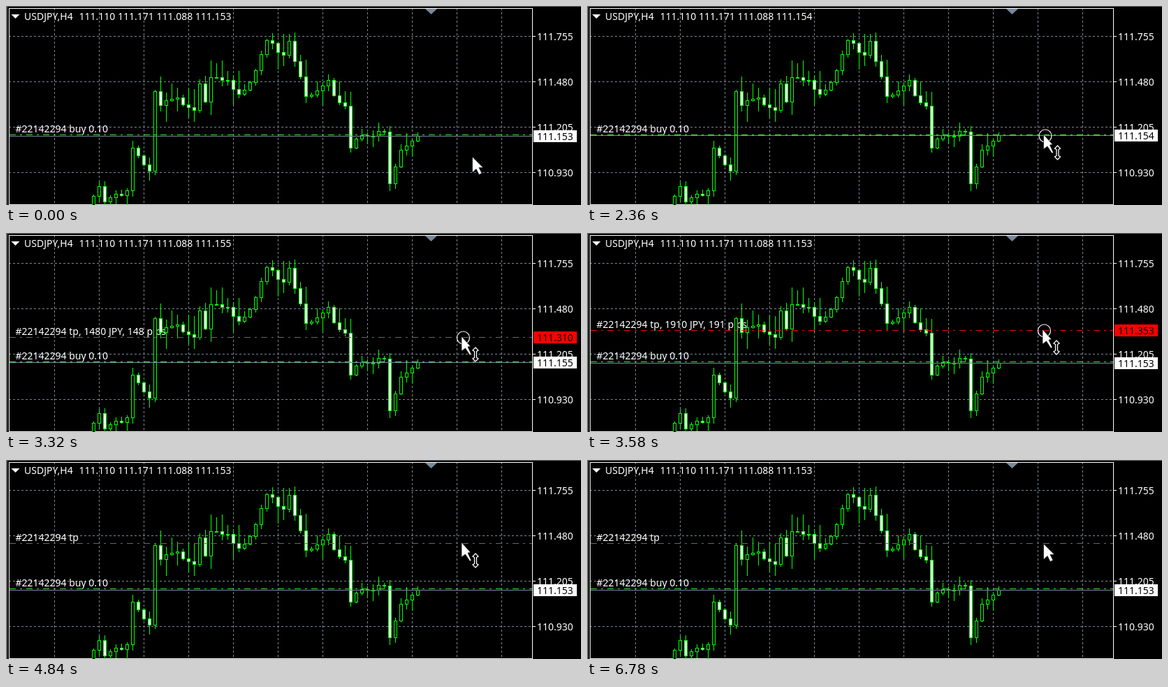
Recreate the animation shown at these times as an HTML page. Size 823 by 285 pixels, loop 6880 ms.

```html
<!DOCTYPE html>
<html lang="en">
<head>
<meta charset="utf-8">
<title>Dragging a take-profit line</title>
<style>
  html, body { margin: 0; width: 100%; height: 100%; overflow: hidden; background: #000; }
  svg { display: block; width: 823px; height: 285px; }
  text { font: 14px "Noto Sans", "Open Sans", sans-serif; fill: #fff; white-space: pre; }
  .crisp { shape-rendering: crispEdges; }
  .grid { stroke: #778899; stroke-dasharray: 3 3; }
  .order { stroke-dasharray: 9 6 3 6; }
  .dark { fill: #000; }
</style>
</head>
<body>
<svg viewBox="0 0 823 285">
  <rect width="823" height="285"/>
  <g class="crisp">
    <rect width="823" height="1" fill="#696969"/>
    <rect width="2" height="285" fill="#696969"/>
  </g>
  <g id="grid" class="crisp"></g>
  <path class="crisp" d="M4.5 3.5H753.5V284.5H4.5Z" fill="none" stroke="#fff"/>
  <path d="M600 4H617L608.5 12Z" fill="#778899"/>
  <path d="M7.5 12H19.5L13.5 18Z" fill="#fff"/>
  <text x="26" y="20">USDJPY,H4</text>
  <text id="title" x="104.5" y="20"></text>
  <text x="13.5" y="181">#22142294 buy 0.10</text>
  <text id="tpText" x="13.5"></text>
  <g id="candles" class="crisp" stroke="#0f0"></g>
  <line id="bidLine" class="crisp" x1="5" x2="753" stroke="#778899"/>
  <line class="crisp order" x1="5" x2="753" y1="184.5" y2="184.5" stroke="#32e632"/>
  <line id="tpLine" class="crisp order" x1="5" x2="753"/>
  <g id="axis"></g>
  <g id="tpTag">
    <rect class="crisp" x="755" y="-8" width="62" height="17" fill="#f00"/>
    <text class="dark" x="760" y="6"></text>
  </g>
  <g id="bidTag">
    <rect class="crisp" x="755" y="-8" width="62" height="17" fill="#fff"/>
    <text class="dark" x="760" y="6"></text>
  </g>
  <g id="cursor">
    <circle id="ring" cx="2.5" cy="2" r="9" fill="none" stroke="#fff" stroke-width="1.2"/>
    <path id="arrow" fill="#fff" stroke="#000" stroke-width=".6"/>
    <path id="resize" stroke="#fff" stroke-width="1.3"
      d="M20 16L24 20L21.5 21.5V30.5L24 32L20 36L16 32L18.5 30.5V21.5L16 20Z"/>
  </g>
</svg>
<script>
const LOOP = 6880, STEP = 135;
const HOVER = 1930, PRESS = 2760, RELEASE = 4840, LEAVE = 4960;
const BUY_PIPS = 111162;
const $ = id => document.getElementById(id);

function set(el, attrs) {
  for (const key in attrs) el.setAttribute(key, attrs[key]);
}
function add(parent, tag, attrs, text = "") {
  const el = document.createElementNS("http://www.w3.org/2000/svg", tag);
  set(el, attrs);
  el.textContent = text;
  return parent.appendChild(el);
}
function show(el, on) {
  el.style.display = on ? "" : "none";
}
const quote = pips => (pips / 1000).toFixed(3);
const lerp = (a, b, p) => a + (b - a) * p;
const smooth = p => p * p * (3 - 2 * p);
const slowing = p => p * (1.445 - .445 * p);

// Progress from 0 to 1 in equal time steps, the first one at start
function stepped(t, start, count) {
  const done = Math.floor((t - start) / STEP) + 1;
  return Math.min(Math.max(done, 0), count) / count;
}

let seed = 11;
function random() {
  seed = (seed * 16807) % 2147483647;
  return seed / 2147483647;
}

// Grid and price axis
for (let x = 69; x < 753; x += 64)
  add($("grid"), "line", { class: "grid", x1: x + .5, x2: x + .5, y1: 3, y2: 285 });
for (let i = 0; i < 4; i++) {
  const y = 43 + 65 * i;
  add($("grid"), "line", { class: "grid", x1: 4, x2: 753, y1: y + .5, y2: y + .5 });
  add($("axis"), "rect", { class: "crisp", x: 754, y, width: 4, height: 1, fill: "#fff" });
  add($("axis"), "text", { x: 760, y: y + 6 }, quote(111755 - 275 * i));
}

// Turning points of the price: candle index, y
const turns = [
  [0, 290], [2, 258], [3, 280], [7, 264], [8, 203], [11, 236], [12, 122], [13, 142],
  [16, 131], [19, 149], [20, 111], [21, 137], [22, 102], [25, 106], [27, 126], [29, 109],
  [32, 49], [35, 70], [36, 50], [39, 129], [43, 106], [44, 128], [46, 143], [47, 203],
  [49, 185], [53, 180], [54, 254], [56, 206], [59, 186]
];
function closeAt(i) {
  const next = turns.findIndex(turn => turn[0] >= i);
  const [i1, y1] = turns[next];
  if (i1 === i) return y1;
  const [i0, y0] = turns[next - 1];
  return Math.round(lerp(y0, y1, (i - i0) / (i1 - i0)) + 8 * (random() - .5));
}

const wick = () => Math.round(2 + 24 * random() ** 2);
function drawCandle(i, open, close) {
  const x = 117.5 + 8 * i;
  const top = Math.min(open, close), height = Math.abs(open - close);
  add($("candles"), "line", { x1: x, x2: x, y1: top - wick(), y2: top + height + wick() });
  return add($("candles"), "rect", {
    x: x - 2, y: top + .5, width: 4, height: Math.max(height, 1),
    fill: close > open ? "#fff" : "#000"
  });
}
let open = 300, lastBody;
for (let i = 0; i < 60; i++) {
  const close = closeAt(i);
  lastBody = drawCandle(i, open, close);
  open = close;
}
const lastBottom = +lastBody.getAttribute("y") + +lastBody.getAttribute("height");

// Bid: time, last digits
const bids = [
  [0, 153], [1530, 154], [3320, 155], [3440, 152], [3580, 153],
  [5550, 154], [6360, 153], [6510, 152], [6660, 154], [6780, 153]
];
const plainArrow = "M0 0L15.5 15.5H9.5L13.5 23.5L9.5 25.5L5.5 17.5L0 22.5Z";
const slimArrow = "M0 0L13 14.5L9 15L14 26L12 27L5.5 17L0 21Z";

function drawBid(t) {
  const digits = bids.findLast(bid => bid[0] <= t)[1];
  const y = digits < 154 ? 186 : 185;
  $("title").textContent = "111.110 111.171 111.088 111." + digits;
  $("bidTag").lastElementChild.textContent = "111." + digits;
  set($("bidTag"), { transform: `translate(0 ${y})` });
  set($("bidLine"), { y1: y + .5, y2: y + .5 });
  set(lastBody, { y: y + .5, height: lastBottom - y - .5 });
}

const levelAt = t => Math.round(lerp(176, 119, slowing(stepped(t, PRESS + STEP, 11))));

function drawTakeProfit(t) {
  const placed = t >= PRESS, dragging = placed && t < RELEASE;
  const y = levelAt(t);
  const pips = Math.round(148 + (149 - y) * 98 / 23);
  const red = dragging && t >= 3580;
  show($("tpLine"), placed);
  show($("tpText"), placed);
  show($("tpTag"), dragging);
  set($("tpLine"), { y1: y + .5, y2: y + .5, stroke: red ? "#f00" : "#666" });
  set($("tpText"), { y: y - 3 });
  $("tpText").textContent = "#22142294 tp" + (dragging ? `, ${pips * 10} JPY, ${pips} pips` : "");
  set($("tpTag"), { transform: `translate(0 ${y})` });
  $("tpTag").lastElementChild.textContent = quote(BUY_PIPS + pips);
}

function pointerAt(t) {
  if (t >= LEAVE) return [653.5, 120];
  if (t >= PRESS) return [652, levelAt(t) - 1];
  const near = smooth(stepped(t, 690, 7)), touch = stepped(t, 1810, 2);
  return [667.5 - 12 * near - 2 * touch, Math.round(216 - 28 * near - 4 * touch)];
}

function drawCursor(t) {
  const onLine = t >= HOVER && t < LEAVE;
  set($("cursor"), { transform: `translate(${pointerAt(t)})` });
  set($("arrow"), { d: onLine ? slimArrow : plainArrow });
  show($("resize"), onLine);
  show($("ring"), t >= 2360 && t < RELEASE);
}

const start = performance.now();
function frame() {
  const t = (performance.now() - start) % LOOP;
  drawBid(t);
  drawTakeProfit(t);
  drawCursor(t);
  requestAnimationFrame(frame);
}
frame();
</script>
</body>
</html>
```
